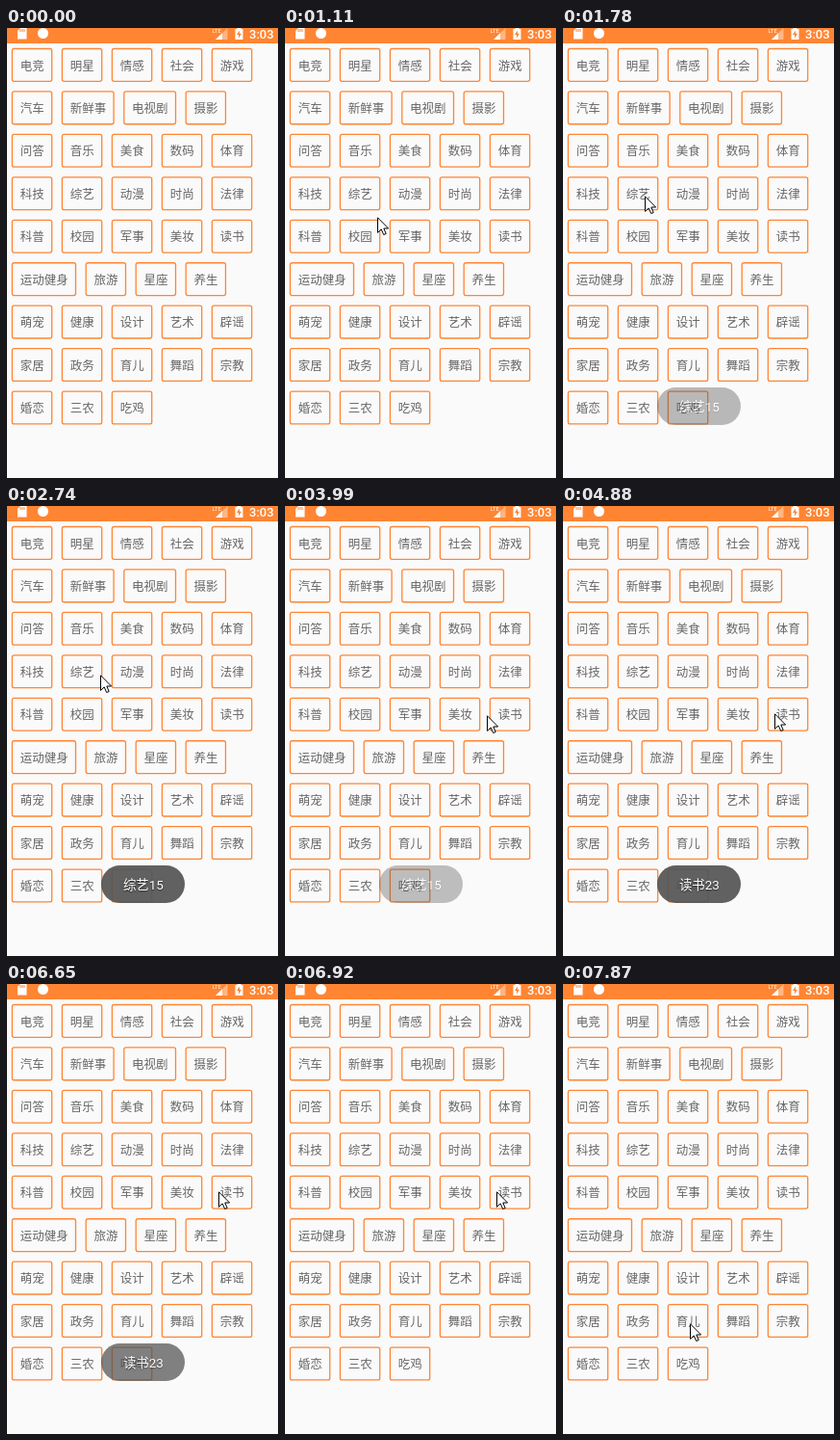
An HTML page for the animation above (8000 ms loop, 283 by 467 pixels).

```html
<!DOCTYPE html>
<html lang="zh-CN">
<head>
<meta charset="utf-8">
<title>标签列表</title>
<style>
  html, body { margin: 0; width: 100%; height: 100%; overflow: hidden; background: #fafafa; }
  svg { display: block; width: 283px; height: 467px; }
  text { font-family: Roboto, "Noto Sans CJK SC", "Noto Sans CJK", sans-serif; }
  .chip rect { fill: none; stroke: #ff8533; stroke-width: 1.3; }
  .chip text { font-size: 12.5px; fill: #666; }
  .toast { opacity: 0; animation: 8s step-end infinite; }
  .toast rect { fill: rgb(84 84 84 / .92); }
  .toast text { font-size: 13.4px; fill: #fff; text-anchor: middle; text-shadow: 0 1px 1.5px rgb(0 0 0 / .6); }
  #first { animation-name: first; }
  #second { animation-name: second; }
  #cursor { animation: move 8s step-end infinite; }

  @keyframes first {
    0% { opacity: 0; }
    22.25% { opacity: .43; }
    23.75% { opacity: .8; }
    25.625% { opacity: 1; }
    48.375% { opacity: .8; }
    49.875% { opacity: .4; }
    51.875%, 100% { opacity: 0; }
  }
  @keyframes second {
    0% { opacity: 0; }
    57.625% { opacity: .4; }
    59.5% { opacity: .8; }
    61% { opacity: 1; }
    83.125% { opacity: .8; }
    84.625% { opacity: .4; }
    86.5%, 100% { opacity: 0; }
  }
  @keyframes move {
    0% { opacity: 0; transform: translate(212px, 411px); }
    8.5% { opacity: 1; transform: translate(212px, 411px); }
    10.5% { transform: translate(140px, 268px); }
    12.375% { transform: translate(112px, 222px); }
    13.875% { transform: translate(97px, 196px); }
    15.375% { transform: translate(89px, 180px); }
    16.875% { transform: translate(86px, 174px); }
    34.25% { transform: translate(98px, 175px); }
    36.125% { transform: translate(150px, 180px); }
    37.625% { transform: translate(205px, 191px); }
    39.125% { transform: translate(233px, 199px); }
    46.875% { transform: translate(226px, 206px); }
    48.375% { transform: translate(216px, 214px); }
    49.875% { transform: translate(211px, 217px); }
    51.875% { transform: translate(221px, 215px); }
    93.5% { transform: translate(196px, 255px); }
    95% { transform: translate(158px, 318px); }
    96.5% { transform: translate(127px, 361px); }
    98.375%, 100% { opacity: 1; transform: translate(133px, 352px); }
  }
</style>
</head>
<body>
<svg viewBox="0 0 283 467">
  <rect width="283" height="467" fill="#fafafa"/>
  <rect width="283" height="16" fill="#ff8533"/>

  <!-- status bar -->
  <g fill="#fff">
    <path d="M15 0H21.5V11.5H12V3Z"/>
    <path d="M15 1V4M17 1V4M19 1V4" stroke="#ff8533"/>
    <circle cx="38.5" cy="5.5" r="5.5"/>
    <text x="214.5" y="4.5" font-size="6">LTE</text>
    <path d="M218 12L230.5 0V12Z" opacity=".4"/>
    <path d="M218 12L225 5.3V12Z"/>
    <path d="M238.5 1H240.5V0H244.5V1H246.5V12H238.5Z"/>
    <path d="M243 2.5L240 7H242V10.5L245 5.8H243Z" fill="#ff8533"/>
    <text x="253" y="11" font-size="13" font-weight="500">3:03</text>
  </g>

  <g id="chips"></g>
  <rect width="1" height="467" fill="#111"/>

  <g id="first" class="toast">
    <rect x="99" y="373" width="87" height="39" rx="19.5"/>
    <text x="142.8" y="398.3">综艺15</text>
  </g>
  <g id="second" class="toast">
    <rect x="99" y="373" width="87" height="39" rx="19.5"/>
    <text x="142.8" y="398.3">读书23</text>
  </g>

  <path id="cursor" d="M.5 .8V16.4L4.2 12.9L6.7 18.5L9.2 17.5L6.8 12H11.6Z" fill="#fff" stroke="#000"/>
</svg>
<script>
  const rows = [
    "电竞 明星 情感 社会 游戏",
    "汽车 新鲜事 电视剧 摄影",
    "问答 音乐 美食 数码 体育",
    "科技 综艺 动漫 时尚 法律",
    "科普 校园 军事 美妆 读书",
    "运动健身 旅游 星座 养生",
    "萌宠 健康 设计 艺术 辟谣",
    "家居 政务 育儿 舞蹈 宗教",
    "婚恋 三农 吃鸡"
  ];
  const glyph = 12.4, pad = 8.85, gap = 9.5, height = 35, pitch = 44.45;

  function chip(label, x, y) {
    const width = label.length * glyph + 2 * pad;
    return `<g class="chip">
      <rect x="${x + .6}" y="${y + .6}" width="${width - 1.2}" height="${height - 1.2}" rx="2"/>
      <text x="${x + pad}" y="${y + 22.6}">${label}</text>
    </g>`;
  }

  document.getElementById("chips").innerHTML = rows.map((row, i) => {
    let x = 5.8;
    return row.split(" ").map(label => {
      const html = chip(label, x, 20.9 + i * pitch);
      x += label.length * glyph + 2 * pad + gap;
      return html;
    }).join("");
  }).join("");
</script>
</body>
</html>
```
